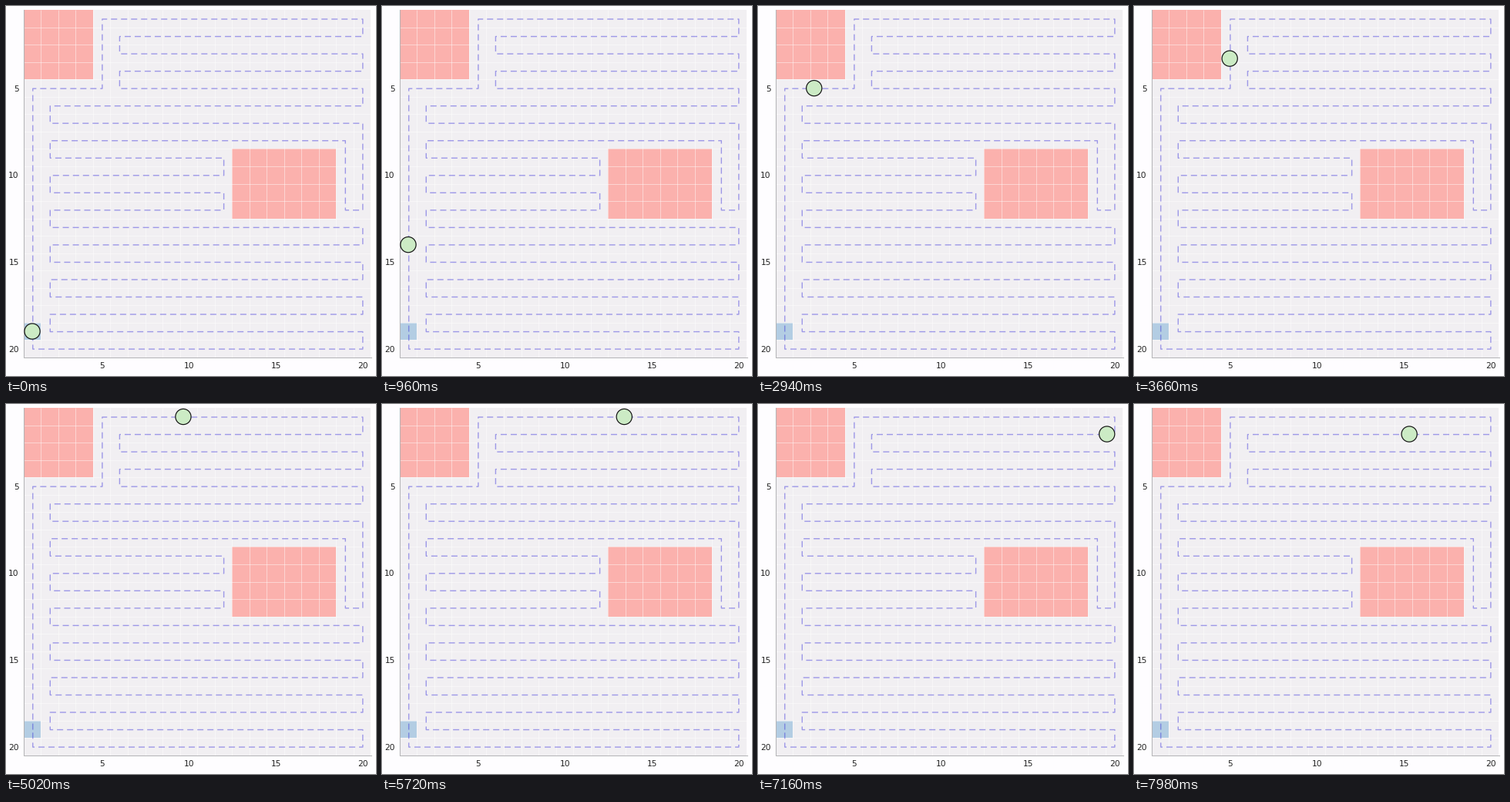
These frames come from a looping animation (480x480 px, 8 s). A matplotlib script:

```python
import numpy as np
import matplotlib.pyplot as plt
from matplotlib.animation import FuncAnimation
from matplotlib.patches import Circle, Rectangle

plt.rcParams["font.family"] = "DejaVu Sans"

SIZE = 480
CELL = 22.53
N = 20
ORIGIN = np.array([23.5, 5.75])   # pixel corner of the board for the route
TILES = ORIGIN - (0.7, 0.5)       # tiles and ball sit slightly up and left
INTERVAL = 20
FRAMES = 400
STEP = 359 / 1439                 # cells travelled per move

RED, BLUE, GREEN = "#fbb1ad", "#b3cde3", "#ccebc5"


def sweep(start, end, rows):
    """Corners of a back-and-forth sweep over the rows."""
    corners = []
    for y in rows:
        corners += [(start, y), (end, y)]
        start, end = end, start
    return corners


def build_route():
    route = [(1, 19), (1, 5), (5, 5)]
    route += sweep(5, N, [1])
    route += sweep(N, 6, range(2, 6))
    route += sweep(N, 2, range(6, 8))
    route += [(N, 12), (19, 12), (19, 8)]
    route += sweep(2, 12, range(8, 9))[:1]
    route += sweep(2, 12, range(9, 13))
    route += sweep(2, N, range(13, 20))
    route += sweep(N, 1, [20])
    return np.array(route + route[:1], float)


ROUTE = build_route()
DIST = np.r_[0, np.cumsum(np.abs(np.diff(ROUTE, axis=0)).sum(axis=1))]


def to_px(cell, origin=ORIGIN):
    """Pixel position of a cell centre (cells count from 1)."""
    return origin + (np.asarray(cell) - 0.5) * CELL


def block(x, y, w, h, color):
    corner = to_px((x - 0.5, y - 0.5), TILES)
    ax.add_patch(Rectangle(corner, w * CELL, h * CELL, fc=color, lw=0, zorder=1))


def ball_at(i):
    # Moves come in threes: shown for 20, 100 and 20 ms.
    period, r = divmod(i * INTERVAL, 140)
    moves = 3 * period + (r >= 20) + (r >= 120)
    cell = [np.interp(moves * STEP, DIST, axis) for axis in ROUTE.T]
    return to_px(cell, TILES)


fig = plt.figure(figsize=(SIZE / 72, SIZE / 72), dpi=72, facecolor="#fefdff")
ax = fig.add_axes([0, 0, 1, 1])
ax.set(xlim=(0, SIZE), ylim=(SIZE, 0))
ax.axis("off")

block(1, 1, N, N, "#f1eff2")
block(1, 1, 4, 4, RED)
block(13, 9, 6, 4, RED)
block(1, 19, 1, 1, BLUE)

x0, y0 = TILES
x1, y1 = ORIGIN + N * CELL
edges = np.arange(1, N) * CELL
grid = dict(color="white", alpha=0.45, lw=1, zorder=2)
ax.vlines(x0 + edges, y0, y1, **grid)
ax.hlines(y0 + edges, x0, x1, **grid)

ax.plot([x0, x0, x1], [y0, y1, y1], color="#b4b4b6", lw=1, zorder=3)

ax.plot(*to_px(ROUTE).T, color="#2a20d8", alpha=0.42, lw=1.4,
        dashes=(8 / 1.4, 5 / 1.4), dash_capstyle="butt", snap=False, zorder=4)

for v in range(5, N + 1, 5):
    tx, ty = to_px((v, v))
    style = dict(size=10.6, color="#222222", va="center_baseline")
    ax.text(tx, 465.8, str(v), ha="center", **style)
    ax.text(16.8, ty - 0.3, str(v), ha="right", **style)

ball = ax.add_patch(Circle(ball_at(0), 10.1, fc=GREEN, ec="#141414",
                           lw=1.2, zorder=5))


def update(i):
    ball.center = ball_at(i)
    return [ball]


anim = FuncAnimation(fig, update, frames=FRAMES, interval=INTERVAL,
                     repeat=True, repeat_delay=0, blit=False)
plt.show()
```
